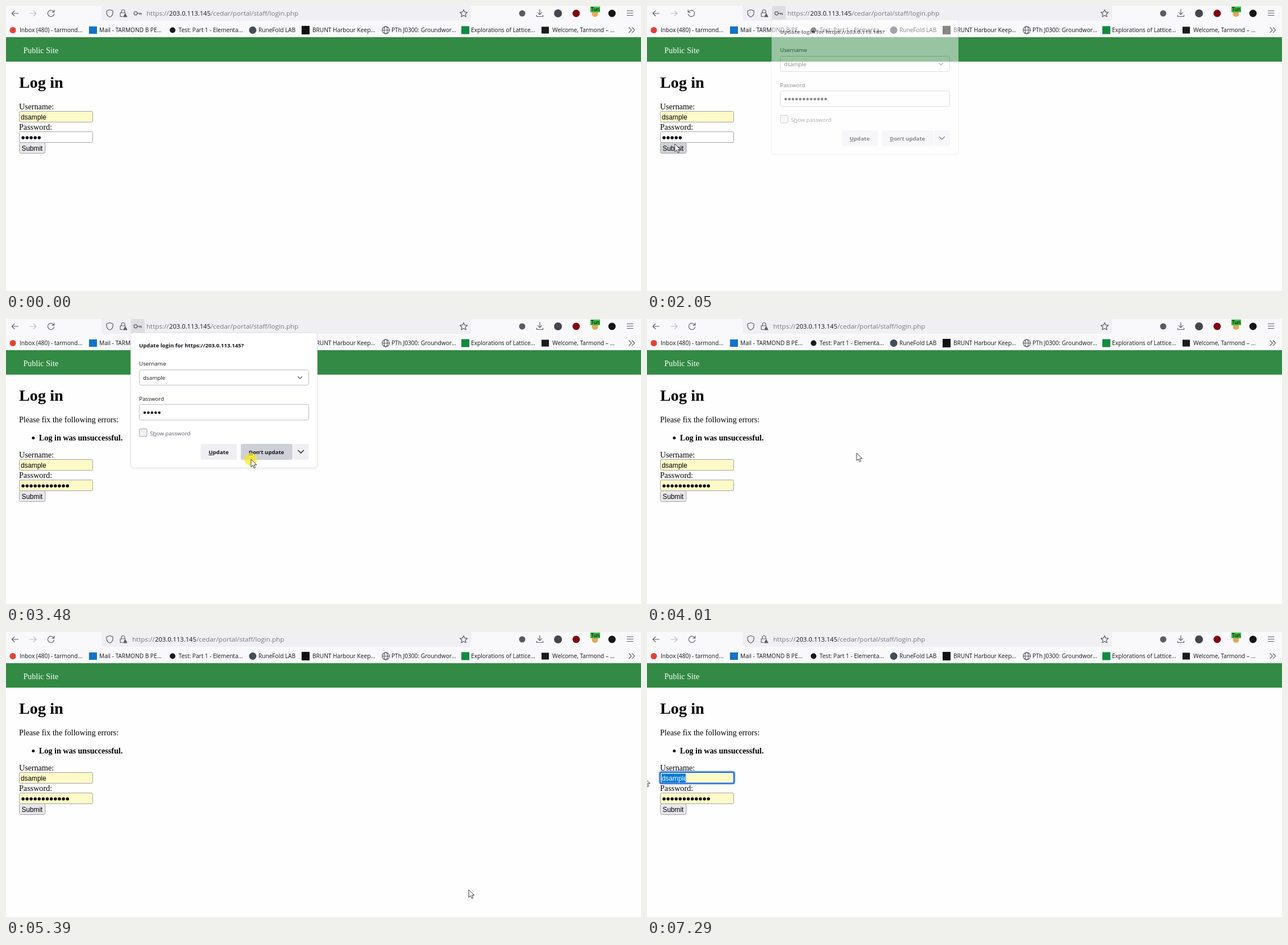
Write an HTML page that moves like this. It is 1117 px wide and 502 px high and loops after 8000 ms.

```html
<!DOCTYPE html>
<html lang="en">
<head>
<meta charset="utf-8">
<title>Log in</title>
<style>
html, body { margin: 0; width: 100%; height: 100%; overflow: hidden; background: #fefefe; }
svg { display: block; width: 1117px; height: 502px; }
text { white-space: pre; }
.ui { font: 10.15px "Open Sans", "Noto Sans", sans-serif; fill: #15141a; }
.field { font: 11.85px "Liberation Sans", Arial, sans-serif; fill: #000; }
.small { font-size: 9.8px; }
.semi { font-size: 9.65px; font-weight: 700; }
.url { font-size: 11.6px; fill: #77777e; }
.page { font: 14.15px "Liberation Serif", serif; fill: #000; }
.page .head { font-size: 28.3px; font-weight: 700; }
.page .strong { font-size: 14.1px; font-weight: 700; }
.line { fill: none; stroke: #5b5b66; stroke-width: 1.2; stroke-linecap: round; stroke-linejoin: round; }
.pale { stroke: #bbbbc1; }
.box { stroke: #a2a2ab; }
.yellow { fill: #fdfac8; }
.white { fill: #fff; }
.dots { fill: none; stroke: #000; stroke-width: 5.5; stroke-linecap: round; stroke-dasharray: 0 7.1; }
.dots.tight { stroke: #15141a; stroke-width: 4.7; stroke-dasharray: 0 6.4; }

/* One percent of the loop is 80 ms. */
.a { animation: 8s step-end infinite; animation-name: var(--n); }
@keyframes key { 0% { opacity: 1 } 46.875% { opacity: 0 } }
@keyframes key-back { 0% { opacity: 0 } 24.75% { opacity: 1 } 46.875% { opacity: 0 } }
@keyframes address { 0% { transform: none } 46.875% { transform: translateX(-25px) } }
@keyframes reload { 0% { opacity: 1 } 24.75% { opacity: 0 } 35% { opacity: 1 } }
@keyframes turning { 0% { opacity: 0 } 24.75% { opacity: 1 } 26.5% { opacity: 0 } }
@keyframes stop { 0% { opacity: 0 } 26.5% { opacity: 1 } 35% { opacity: 0 } }
@keyframes before { 0% { opacity: 1 } 28.25% { opacity: 0 } }
@keyframes after { 0% { opacity: 0 } 28.25% { opacity: 1 } }
@keyframes submit {
  0% { fill: #e9e9ed } 16.375% { fill: #d0d0d7 } 21.375% { fill: #b1b1b9 } 22.25% { fill: #d0d0d7 }
}
@keyframes popup {
  0% { opacity: 0; transform: translateY(-2px) }
  24.75% { opacity: .25; transform: translateY(-1.5px) }
  25.6% { opacity: .5; transform: translateY(-1px) }
  26.5% { opacity: .75; transform: translateY(-.5px) }
  27.375% { opacity: 1; transform: none }
  46.875% { opacity: 0; transform: none }
}
@keyframes decline { 0% { fill: #f0f0f4 } 39.25% { fill: #e0e0e6 } 43.5% { fill: #cfcfd8 } }
@keyframes field-hover { 0% { stroke: #a2a2ab } 82.6% { stroke: #76767f } }
@keyframes focus { 0% { opacity: 0 } 87% { opacity: 1 } }
@keyframes select {
  0% { clip-path: inset(0 0 0 100%) }
  88.0625% { clip-path: inset(0 0 0 28px) }
  89.0625% { clip-path: inset(0 0 0 8px) }
  90.0625% { clip-path: inset(0) }
}
@keyframes press {
  0% { opacity: 0 } 21.375% { opacity: 1 } 22.25% { opacity: 0 }
  43.5% { opacity: 1 } 46.875% { opacity: 0 } 87% { opacity: 1 } 91% { opacity: 0 }
}
@keyframes arrow {
  0% { opacity: 0 } 2.5% { opacity: 1 } 11.19% { opacity: 0 } 16.375% { opacity: 1 }
  52.75% { opacity: 0 } 60.625% { opacity: 1 } 79% { opacity: 0 } 91% { opacity: 1 }
}
@keyframes beam {
  0% { opacity: 0 } 11.19% { opacity: 1 } 16.375% { opacity: 0 }
  52.75% { opacity: 1 } 60.625% { opacity: 0 } 79% { opacity: 1 } 91% { opacity: 0 }
}
@keyframes move {
  0% { transform: translate(690px, 400px) }
  3.25% { transform: translate(496px, 305px) }
  6.875% { transform: translate(496px, 305px); animation-timing-function: steps(4, start) }
  10.325% { transform: translate(130px, 172px); animation-timing-function: steps(4, start) }
  13.775% { transform: translate(50px, 228px) }
  14.625% { transform: translate(50px, 228px); animation-timing-function: steps(3, start) }
  17.249% { transform: translate(48px, 242px) }
  17.25% { transform: translate(49px, 243px) }
  29.125% { transform: translate(49px, 243px); animation-timing-function: steps(7, start) }
  35% { transform: translate(300px, 246px); animation-timing-function: steps(6, start) }
  40.125% { transform: translate(431px, 247px) }
  50.125% { transform: translate(431px, 247px); animation-timing-function: steps(5, start) }
  54.5% { transform: translate(119px, 192px); animation-timing-function: steps(5, start) }
  58.875% { transform: translate(190px, 214px); animation-timing-function: steps(2, start) }
  60.625% { transform: translate(151px, 202px); animation-timing-function: steps(3, start) }
  63.25% { transform: translate(554px, 380px) }
  65.75% { transform: translate(554px, 380px); animation-timing-function: steps(2, start) }
  67.374% { transform: translate(853px, 454px) }
  67.375% { transform: translate(814px, 454px) }
  72.375% { transform: translate(620px, 486px) }
  73.25% { transform: translate(470px, 400px) }
  74.125% { transform: translate(338px, 320px) }
  77.375% { transform: translate(338px, 320px); animation-timing-function: steps(3, start) }
  80% { transform: translate(66px, 234px); animation-timing-function: steps(5, start) }
  84.5% { transform: translate(74px, 256px) }
  88.0625% { transform: translate(74px, 256px); animation-timing-function: steps(4, start) }
  92.0625%, 100% { transform: translate(-4.5px, 257px) }
}
</style>
</head>
<body>
<svg viewBox="0 0 1117 502" xmlns="http://www.w3.org/2000/svg">
  <defs>
    <filter id="shadow" x="-5%" y="-5%" width="110%" height="112%">
      <feDropShadow dx="0" dy=".5" stdDeviation="1" flood-opacity=".12"/>
    </filter>
    <path id="reload-icon" d="M5 -2.6A5.6 5.6 0 1 0 5.6 1M5.8 -6V-2.2H2"/>
  </defs>
  <rect width="1117" height="502" fill="#fefefe"/>

  <!-- Browser bar -->
  <rect width="1117" height="55" fill="#f9f9fb"/>
  <rect y="54" width="1117" height="1" fill="#e3e6e4"/>
  <path d="M168 0H818V22q0 4-4 4H172q-4 0-4-4z" fill="#f0f0f4"/>
  <g class="line">
    <path d="M21.5 13H10.5M15 8.3L10.3 13 15 17.7"/>
    <path class="pale" d="M42 13H53M48.5 8.3L53.2 13 48.5 17.7"/>
    <g class="a" style="--n:reload"><use href="#reload-icon" x="79" y="13"/></g>
    <g class="a" style="--n:turning"><use href="#reload-icon" transform="translate(78 13) scale(-1 1)"/></g>
    <path class="a" style="--n:stop" d="M74.5 8.5l9 9m0-9l-9 9"/>
    <path d="M182.5 6.5L188 8.5V12q0 5-5.5 7.5Q177 17 177 12V8.5z"/>
    <path d="M203 11.500V9.500a3 3 0 0 1 6 0V11.500M205 18.500H201V12H210"/>
    <path d="M209.700 13.500L212.700 19H206.700z" fill="#5b5b66"/>
    <path d="M805 6.500L806.900 10.700 811.500 11.200 808.100 14.300 809.100 18.900 805 16.500 800.900 18.900 801.900 14.300 798.500 11.200 803.100 10.700z"/>
    <path d="M939 6V15M935.5 11.700L939 15.200 942.500 11.700M933.500 16V18.500H944.500V16"/>
    <path d="M1092.500 8.500H1103M1092.500 12.500H1103M1092.500 16.500H1103"/>
    <path d="M1096 38l4.300 4.300-4.300 4.300M1101.500 38l4.300 4.300-4.300 4.300"/>
    <circle cx="668" cy="42.500" r="6.300"/>
    <ellipse cx="668" cy="42.500" rx="2.800" ry="6.300"/>
    <path d="M661.800 42.500H674.200"/>
  </g>
  <rect class="a" style="--n:key-back" x="220" width="24" height="25" rx="2" fill="#dedee2"/>
  <g class="a line" style="--n:key">
    <circle cx="228" cy="12.800" r="3"/>
    <path d="M231 12.800H238V15.500M235.300 13V15"/>
  </g>
  <g class="a ui url" style="--n:address">
    <text x="247" y="17">https://</text>
    <text x="287" y="17" style="font-size:11.2px;fill:#15141a">203.0.113.145</text>
    <text x="360" y="17">/cedar/portal/staff/login.php</text>
  </g>
  <circle cx="908" cy="13" r="5.500" fill="#5b5b66"/>
  <circle cx="971" cy="13" r="7" fill="#46464f"/>
  <circle cx="1003" cy="13" r="6.500" fill="#800610"/>
  <circle cx="1036" cy="13.500" r="5.500" fill="#e3a85c"/>
  <rect x="1028" y="1" width="17" height="10" fill="#3cba43"/>
  <text class="ui" x="1029" y="9" style="font-size:8.5px;font-weight:600">Tun</text>
  <circle cx="1066" cy="13" r="6.500" fill="#151515"/>

  <!-- Bookmarks -->
  <circle cx="12" cy="42.500" r="5.500" fill="#e04436"/>
  <rect x="146" y="36" width="14" height="13" fill="#1273c8"/>
  <circle cx="293" cy="42.500" r="5" fill="#16191d"/>
  <circle cx="434" cy="42.500" r="6.500" fill="#454d55"/>
  <rect x="520" y="35" width="14" height="15" fill="#111"/>
  <rect x="801" y="35.500" width="14" height="14" fill="#128a40"/>
  <rect x="942" y="36.500" width="13" height="12" fill="#1b1b1b"/>
  <g class="ui">
    <text x="24" y="46">Inbox (480) - tarmond...</text>
    <text x="164" y="46">Mail - TARMOND B PE...</text>
    <text x="303.500" y="46">Test: Part 1 - Elementa...</text>
    <text x="444" y="46">RuneFold LAB</text>
    <text x="539" y="46">BRUNT Harbour Keep...</text>
    <text x="678" y="46">PTh J0300: Groundwor...</text>
    <text x="818" y="46">Explorations of Lattice...</text>
    <text x="961" y="46">Welcome, Tarmond – ...</text>
  </g>

  <!-- Page -->
  <rect y="55" width="1117" height="43" fill="#328a44"/>
  <g class="page">
    <text x="30.500" y="83" fill="#fff">Public Site</text>
    <text class="head" x="23" y="143.500">Log in</text>
  </g>

  <g class="a" style="--n:before">
    <g class="page">
      <text x="23" y="182">Username:</text>
      <text x="23" y="217.500">Password:</text>
    </g>
    <rect class="box yellow" x="23.500" y="185.500" width="129" height="19" rx="2"/>
    <rect class="box white" x="23.500" y="221.500" width="129" height="19" rx="2"/>
    <rect class="box a" style="--n:submit" x="23.500" y="240.500" width="45.500" height="19" rx="3"/>
    <text class="field" x="26" y="200">dsample</text>
    <path class="dots" d="M30 232h28.500"/>
    <text class="field" x="27.500" y="255">Submit</text>
  </g>

  <g class="a" style="--n:after">
    <g class="page">
      <text x="23" y="182">Please fix the following errors:</text>
      <circle cx="48" cy="209.500" r="2.500"/>
      <text class="strong" x="58" y="213.500">Log in was unsuccessful.</text>
      <text x="23" y="244">Username:</text>
      <text x="23" y="279.500">Password:</text>
    </g>
    <rect class="box yellow a" style="--n:field-hover" x="23.500" y="247.500" width="129" height="19" rx="2"/>
    <rect class="box yellow" x="23.500" y="283.500" width="129" height="19" rx="2"/>
    <rect class="box" x="23.500" y="302.500" width="45.500" height="19" rx="3" fill="#e9e9ed"/>
    <text class="field" x="26" y="262">dsample</text>
    <path class="dots" d="M30 294h78.500"/>
    <text class="field" x="27.500" y="317">Submit</text>
    <g class="a" style="--n:focus" fill="none" stroke="#0a5fe0" stroke-width="2">
      <rect x="21" y="245" width="134" height="23" rx="4" opacity=".3"/>
      <rect x="23" y="247" width="130" height="19.500" rx="2"/>
    </g>
    <g class="a" style="--n:select">
      <rect x="25.500" y="249.500" width="42.500" height="15.500" fill="#0078d7"/>
      <text class="field" x="26" y="262" style="fill:#fff">dsample</text>
    </g>
  </g>

  <!-- Password prompt -->
  <g class="a" style="--n:popup">
    <rect x="219.500" y="24.500" width="328" height="237.500" rx="4" fill="#fff" stroke="#e6e6ea" filter="url(#shadow)"/>
    <g fill="#fff" stroke="#bcbcc4">
      <rect x="234.500" y="89.500" width="298" height="27" rx="3"/>
      <rect x="234.500" y="150.500" width="298" height="27.500" rx="3"/>
      <rect class="box" x="234.500" y="193.500" width="13.500" height="13.500" rx="2" fill="#f0f0f4"/>
    </g>
    <g fill="#f0f0f4">
      <rect x="342.500" y="220" width="63.500" height="28" rx="3"/>
      <rect class="a" style="--n:decline" x="413" y="220" width="91" height="28" rx="3"/>
      <rect x="505" y="220" width="27.500" height="28" rx="3"/>
    </g>
    <g class="ui small">
      <text class="semi" x="234" y="50">Update login for https://203.0.113.145?</text>
      <text x="234" y="82">Username</text>
      <text x="241" y="107">dsample</text>
      <text x="234" y="143.500">Password</text>
      <text x="253" y="204.500" fill="#5b5b66">S<tspan text-decoration="underline">h</tspan>ow password</text>
      <text class="semi" x="356.500" y="238"><tspan text-decoration="underline">U</tspan>pdate</text>
      <text class="semi" x="427" y="238"><tspan text-decoration="underline">D</tspan>on’t update</text>
    </g>
    <path class="line" d="M513.500 101.500l3.500 3.500 3.500-3.500"/>
    <path class="line" d="M514 231.500l4.700 4.500 4.700-4.500" style="stroke:#15141a;stroke-width:1.4"/>
    <path class="dots tight a" style="--n:before" d="M244 165h70.800"/>
    <path class="dots tight a" style="--n:after" d="M244 165h26"/>
  </g>

  <!-- Pointer -->
  <g class="a" style="--n:move">
    <circle class="a" style="--n:press" cx="-.5" r="11" fill="#f5ea14" fill-opacity=".7"/>
    <path class="a" style="--n:arrow" d="M0 0V13.500L3.200 10.600 5.400 15.600 7.600 14.600 5.500 9.800H9.800z" fill="#fff" stroke="#222" stroke-width=".9"/>
    <path class="a" style="--n:beam" d="M-3.500-7.500H3.500M0-7.500V7.500M-3.500 7.500H3.500" fill="none" stroke="#000" stroke-width="1.300"/>
  </g>
</svg>
</body>
</html>
```
